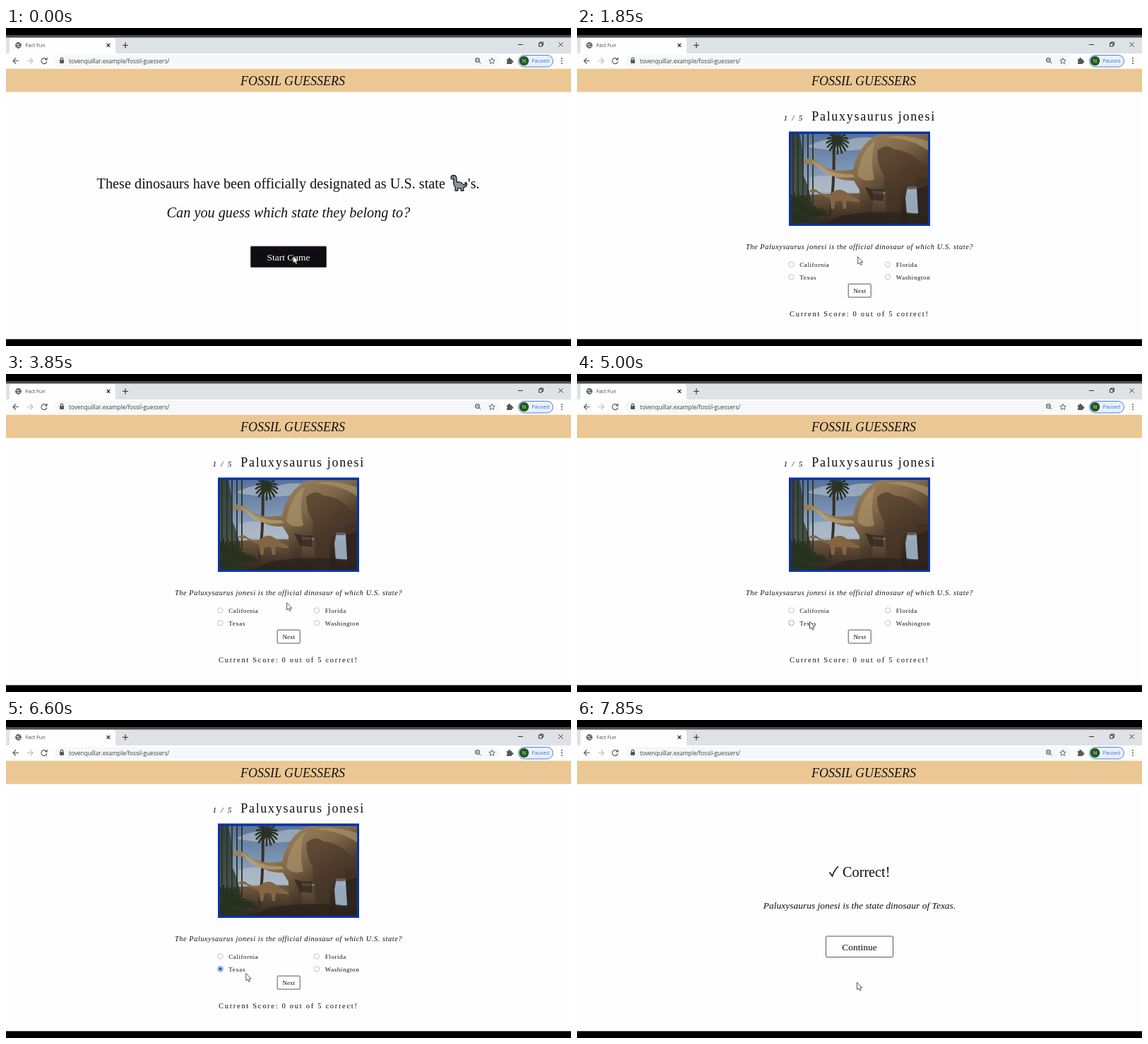
An HTML page that plays this animation: 800 px wide and 450 px high, repeating every 8 s.

```html
<!DOCTYPE html>
<html lang="en">
<head>
<meta charset="utf-8">
<title>Fact Fun</title>
<style>
html, body { margin: 0; width: 100%; height: 100%; overflow: hidden; background: #000; }
svg { display: block; width: 100%; height: 100%; }
text { font-family: "Liberation Serif", "Times New Roman", serif; fill: #111; white-space: pre; font-variant-ligatures: none; }
.ui { font-family: "Open Sans", "Noto Sans", sans-serif; }
.it { font-style: italic; }
.mid { text-anchor: middle; }
.opt { font-size: 9px; letter-spacing: .5625px; }
.line { fill: none; stroke: #55585c; stroke-width: 1.2; }
.btn { fill: #fefdff; stroke: #444; stroke-width: .9; }
.radio { fill: #fff; stroke: #b4b4b4; stroke-width: .8; }
</style>
</head>
<body>
<svg viewBox="0 0 800 450" preserveAspectRatio="none">
  <defs>
    <linearGradient id="sky" x2="0" y2="1">
      <stop stop-color="#587398"/><stop offset=".4" stop-color="#7f97b6"/><stop offset=".7" stop-color="#a3b2c2"/>
    </linearGradient>
    <linearGradient id="hide" gradientUnits="userSpaceOnUse" x1="405" y1="155" x2="470" y2="255">
      <stop stop-color="#9a8059"/><stop offset=".35" stop-color="#80684a"/><stop offset=".7" stop-color="#4b3a2b"/><stop offset="1" stop-color="#30251d"/>
    </linearGradient>
    <linearGradient id="soil" x2="0" y2="1">
      <stop stop-color="#71593f"/><stop offset="1" stop-color="#30261e"/>
    </linearGradient>
    <clipPath id="photoClip"><rect x="303" y="150" width="194" height="127"/></clipPath>
  </defs>

  <rect width="800" height="450"/>
  <rect y="10" width="800" height="430.300" fill="#fefdff"/>

  <!-- browser -->
  <rect y="10" width="800" height="27" fill="#dee1e6"/>
  <rect y="10" width="800" height="3.500" fill="#4a4b4c"/>
  <path d="M1 37Q5 37 5 33V18Q5 14 9 14H151Q155 14 155 18V33Q155 37 159 37Z" fill="#fefefe"/>
  <rect y="36" width="800" height="22" fill="#fefefe"/>
  <rect x="68" y="38" width="632" height="17" rx="8.500" fill="#f6f7f9"/>
  <circle cx="17.500" cy="24.500" r="4.400" fill="#5f6368"/>
  <path d="M14.500 23l3 .8 1.200-2M15.500 27l2-1.400 2.800 1" fill="none" stroke="#fefefe"/>
  <text class="ui" x="27.500" y="27" font-size="7.200" style="fill:#45484c">Fact Fun</text>
  <g class="line">
    <path d="M142.600 22l4.800 4.800m0-4.800l-4.800 4.800M165 24.500h8m-4-4v8" stroke="#333"/>
    <path d="M725 23.500h7M782.500 20.500l6 6m0-6l-6 6M754.500 21.500h4.500v4.500h-4.500zM756 21.500v-1.500h4.500v4.500h-1.500" stroke="#222" stroke-width=".9"/>
    <path d="M18 46.500h-8m4-4l-4 4 4 4"/>
    <path d="M30 46.500h8m-4-4l4 4-4 4" stroke="#bbbdc0"/>
    <path d="M57 44a4 4 0 1 0 .9 3.300M58 41.800v3h-3"/>
    <path d="M77.300 45.500v-1.700a1.700 1.700 0 0 1 3.400 0v1.700"/>
    <circle cx="667.500" cy="45.500" r="2.800"/><path d="M669.700 47.700l2.600 2.600M666.200 45.500h2.600" stroke-width="1"/>
    <path d="M688 42.400l1.200 2.800 3 .2-2.300 2 .7 3-2.600-1.600-2.600 1.600.7-3-2.300-2 3-.2z" stroke-width=".9"/>
  </g>
  <rect x="76" y="45" width="6" height="5" rx=".7" fill="#55585c"/>
  <path d="M709 44h2.300a1.500 1.500 0 1 1 2.800 0h2.200v2.200a1.500 1.500 0 1 1 0 2.800v2h-7.300v-2.300a1.500 1.500 0 0 0 0-2.600z" fill="#55585c"/>
  <text class="ui" x="89" y="49.500" font-size="8.200" style="fill:#3c4043">tovenquillar.example/fossil-guessers/</text>
  <rect x="725.500" y="38.500" width="49" height="16.500" rx="8.200" fill="#e8f0fe" stroke="#4a80d8"/>
  <circle cx="733.500" cy="46.500" r="6.800" fill="#23591d"/>
  <text class="ui mid" x="733.500" y="49" font-size="6.800" style="fill:#fff">N</text>
  <text class="ui" x="744.500" y="49.200" font-size="7.200" style="fill:#3a70cf">Paused</text>
  <g fill="#55585c"><circle cx="787" cy="43" r="1"/><circle cx="787" cy="46.500" r="1"/><circle cx="787" cy="50" r="1"/></g>

  <rect y="57.700" width="800" height="32.800" fill="#ebc793"/>
  <text class="it mid" x="406" y="80.500" font-size="18">FOSSIL GUESSERS</text>

  <g id="intro">
    <text x="128.600" y="227" font-size="20.250">These dinosaurs have been officially designated as U.S. state</text>
    <path d="M630 212q0-3.500 4-3.500 4 0 4 5l.3 4.500q6-1 8.500 3 3.500 2 4-.5-1.500-.8-.8-1.700 2.800-.5 2.600 2.500-.6 4-4.800 4v5h-3.600v-3.500h-4.500v3.500h-3.600v-5q-3.500-3.500-1.900-11.300-4.200.5-4.200-2z" fill="#8a959d" stroke="#16191c" stroke-width="1.300" stroke-linejoin="round"/>
    <circle cx="633.500" cy="211.300" r=".7"/>
    <text x="654" y="227" font-size="20.250">'s.</text>
    <text class="it mid" x="400" y="267.500" font-size="20.250">Can you guess which state they belong to?</text>
    <rect id="startBox" class="btn" x="346.500" y="309" width="107" height="29.500" rx="1"/>
    <text class="mid" x="400" y="328.500" font-size="13.500" style="fill:#fefdff">Start Game</text>
  </g>

  <g id="quiz">
    <text class="it" x="292.500" y="130.700" font-size="11.250" letter-spacing="1.690">1 / 5</text>
    <text x="332.300" y="130.700" font-size="18" letter-spacing="1.690">Paluxysaurus jonesi</text>
    <rect x="300" y="146.500" width="200" height="133.500" fill="#0a34a4"/>
    <g clip-path="url(#photoClip)">
      <rect x="303" y="150" width="194" height="127" fill="url(#sky)"/>
      <path d="M325 168q30-16 55-8 20-8 45-4l-15 14q-30 8-85-2zM330 212q30-10 75 8v12h-75z" fill="#b9c3cd" opacity=".6"/>
      <path d="M303 238q90-8 194 0v39H303z" fill="url(#soil)"/>
      <path d="M452 234h45v26q-24 6-45-4z" fill="#95a8ba"/>
      <path d="M303 150h12q8 35 4 55 10 20 14 45l10 27h-40z" fill="#2a3323" opacity=".75"/>
      <g id="trees" fill="none" stroke="#2a3225"/>
      <path d="M329 231q3-5 10-2 8 8 20 6 10-10 20-4 10 7 25 15-14 1-22-2l-1 12h-4l-2-11h-9l-2 11h-4l-2-15q-15-5-19-9-5 2-10-1z" fill="#846543"/>
      <path d="M321 190q1-6 9-5 10 3 17 10 18 10 44 5 6-28 24-42 10-9 26-9h58v66q-14 12-31 9l-3 16 3 37h-28l-3-45-18-2-1 45h-17l-1-46q-5-8-8-13-25 1-44-17-12-6-23-7-3 1-4-2z" fill="url(#hide)"/>
      <path d="M480 212h17v65h-13z" fill="#30251e"/>
      <path d="M425 174q12-12 24-2 24 0 48 30v20q-20 10-36 4-4 20-2 51h-20q-6-50-4-68-10-14-10-35z" fill="#4a3828" opacity=".65"/>
      <path d="M397 208q5-35 26-49-9 28-2 55-15 6-24-6zM437 155q24-7 60 5v13q-25-17-60-18z" fill="#ad956c" opacity=".65"/>
      <path d="M332 188q12 5 20 11 16 9 38 8l3 4q-33 3-47-9z" fill="#c1a775" opacity=".65"/>
      <path d="M408 225q14 5 26 3v17l-18-2z" fill="#30251d" opacity=".75"/>
      <path d="M372 266q60-12 125 1v10H350z" fill="#29211b" opacity=".7"/>
      <path id="brush" fill="none" stroke="#25301d" stroke-width="2"/>
    </g>
    <text class="it mid" x="400" y="313.300" font-size="10.350" letter-spacing=".5625">The Paluxysaurus jonesi is the official dinosaur of which U.S. state?</text>
    <g id="options"></g>
    <circle id="dot" cx="303.500" cy="352.300" r="2.200" fill="#1a5fc0"/>
    <rect id="nextBox" class="btn" x="384.200" y="362.200" width="32" height="18.800" rx="1"/>
    <text id="nextText" class="mid" x="400.200" y="374.700" font-size="9">Next</text>
    <text x="301" y="408" font-size="10.530" letter-spacing="1.690">Current Score: 0 out of 5 correct!</text>
  </g>

  <g id="result">
    <path d="M357.500 215.500l4 5.500q3-9 8.500-14" fill="none" stroke="#111" stroke-width="1.600"/>
    <text x="376" y="221.500" font-size="20.250">Correct!</text>
    <text class="it mid" x="400" y="267" font-size="13.500">Paluxysaurus jonesi is the state dinosaur of Texas.</text>
    <rect class="btn" x="352.500" y="306" width="95" height="29.500" rx="1"/>
    <text class="mid" x="400" y="325.500" font-size="13.500">Continue</text>
  </g>

  <path id="cursor" d="M0 0V10.200L2.400 8.200 4 11.800 5.700 11 4.200 7.600H7.300Z" fill="#fff" stroke="#333" stroke-width=".8"/>
</svg>
<script>
const LOOP = 8000, STEP = 50;
const $ = id => document.getElementById(id);
const ramp = (t, a, b) => Math.min(1, Math.max(0, (t - a) / (b - a)));
const ease = k => k * k * (3 - 2 * k);
const mix = (a, b, k) => `rgb(${a.map((v, i) => Math.round(v + (b[i] - v) * k))})`;
const show = (id, on) => $(id).style.display = on ? '' : 'none';
const INK = [15, 13, 18], PAPER = [254, 253, 255];

// start, end, x, y
const moves = [
  [0, 0, 406.5, 322.5],
  [0, 150, 397.6, 323.7],
  [4350, 4900, 329.5, 350.5],
  [6300, 6600, 339.8, 358.5],
  [6600, 7000, 396.5, 371.3]
];

function pointer(t) {
  let x = 0, y = 0;
  for (const [a, b, tx, ty] of moves) {
    const k = a === b ? 1 : ease(ramp(t, a, b));
    x += (tx - x) * k;
    y += (ty - y) * k;
  }
  return [x, y];
}

function buildOptions() {
  const names = ['California', 'Florida', 'Texas', 'Washington'];
  $('options').innerHTML = names.map((name, i) => {
    const x = i % 2 ? 440 : 303.5, y = i < 2 ? 334.5 : 352.3;
    return `<circle class="radio" id="radio${i}" cx="${x}" cy="${y}" r="3.7"/>` +
      `<text class="opt" x="${x + 11.8}" y="${y + 3.7}">${name}</text>`;
  }).join('');
}

function fan(x, y, r, n, from, to) {
  let d = '';
  for (let i = 0; i < n; i++) {
    const a = from + (to - from) * i / (n - 1);
    const dx = Math.cos(a) * r, dy = Math.sin(a) * r;
    d += `M${x} ${y}q${dx * .6} ${dy * .6 - 3} ${dx} ${dy + 3}`;
  }
  return d;
}

function buildTrees() {
  let trunks = '';
  for (let i = 0; i < 5; i++) trunks += `M${306 + i * 7} 150V250`;
  $('trees').innerHTML =
    `<path d="${trunks}" stroke-width="1.8"/>` +
    `<path d="M357 270Q366 220 363 150" stroke="#3a3024" stroke-width="4"/>` +
    `<path d="${fan(369, 160, 16, 17, -Math.PI, Math.PI)}" stroke-width="2.6"/>`;
  $('brush').setAttribute('d', [[308, 252, 22], [322, 262, 20], [341, 266, 15], [312, 274, 18]]
    .map(([x, y, r]) => fan(x, y, r, 11, -Math.PI, 0)).join(''));
}

function render(t) {
  const toQuiz = t >= 1150, toResult = t >= 7450;
  show('intro', !toQuiz);
  show('quiz', toQuiz && !toResult);
  show('result', toResult);

  $('startBox').style.fill = mix(INK, PAPER, ramp(t, 800, 1000));

  const checked = t >= 5250;
  show('dot', checked);
  $('radio2').style.stroke = checked ? '#1a5fc0' : t >= 4800 ? '#8c8c8c' : '#b4b4b4';

  const hover = ramp(t, 6900, 7100), press = ramp(t, 7150, 7350);
  $('nextBox').style.fill = mix(PAPER, INK, hover * (1 - press));
  $('nextText').style.fill = mix(INK, PAPER, hover);

  $('cursor').setAttribute('transform', `translate(${pointer(t)})`);
}

function tick() {
  render(Math.floor(performance.now() % LOOP / STEP) * STEP);
  requestAnimationFrame(tick);
}

buildOptions();
buildTrees();
tick();
</script>
</body>
</html>
```
